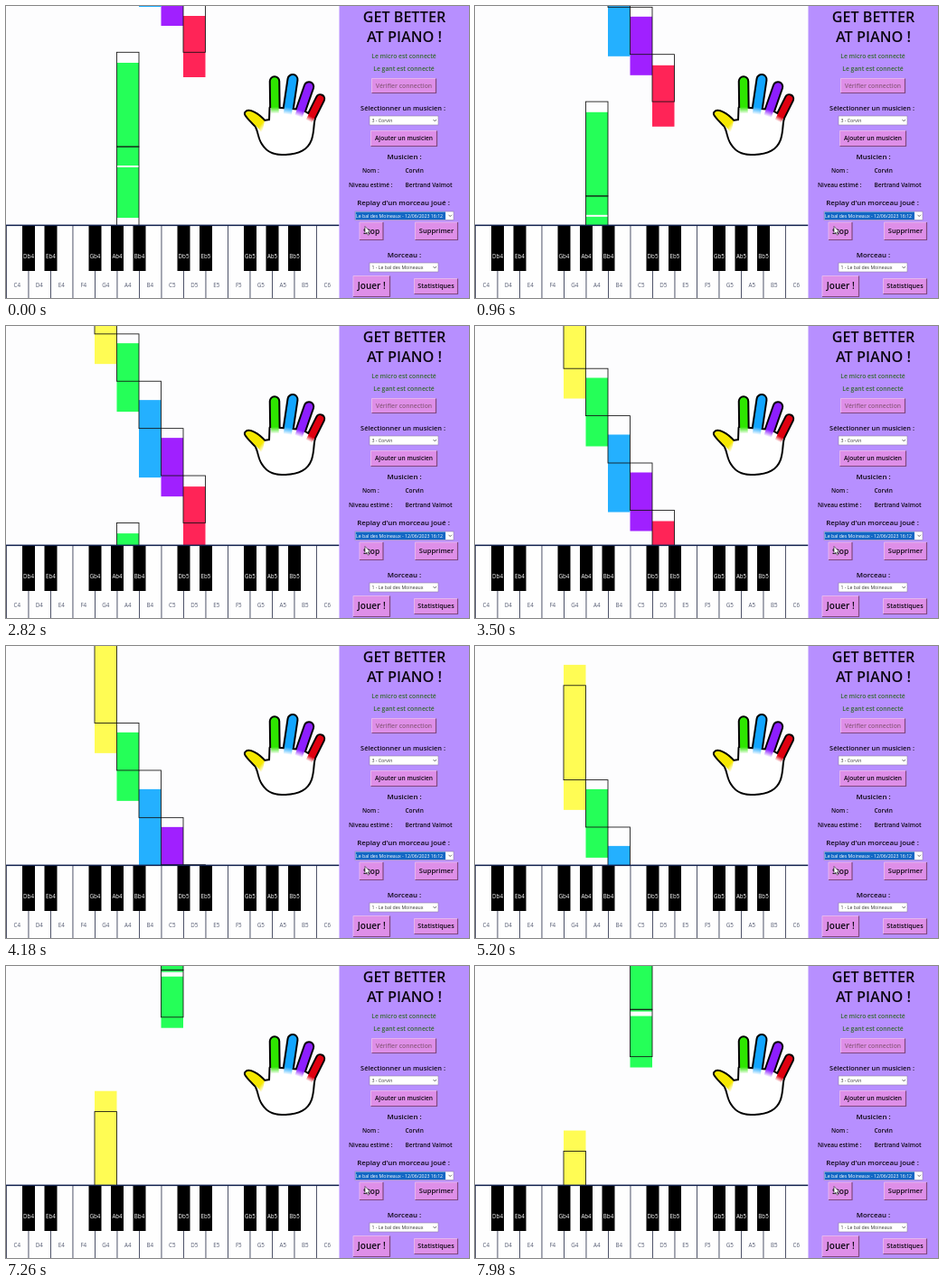
An HTML page for the animation above (8 s loop, 512 by 324 pixels).

```html
<!DOCTYPE html>
<html lang="fr">
<head>
<meta charset="utf-8">
<title>Piano</title>
<style>
  html, body { margin: 0; width: 100%; height: 100%; overflow: hidden; background: #fdfdfe; }
  svg { display: block; width: 100vw; height: 100vh; font-family: "Open Sans", sans-serif; }
  .box { fill: none; stroke: #111; stroke-width: .85; }
</style>
</head>
<body>
<svg viewBox="0 0 512 324">
  <defs><clipPath id="lane"><rect width="368" height="243"/></clipPath></defs>
  <rect width="512" height="324" fill="#fdfdfe"/>
  <g clip-path="url(#lane)"><g id="notes"></g></g>
  <g id="keys"></g>
  <g id="hand"></g>
  <rect x="368.500" width="143.500" height="324" fill="#b78fff"/>
  <g id="panel"></g>
  <path d="M397 244.500v8.500l2-1.800 1.400 3 1.300-.6-1.300-2.900h2.600z" fill="#fff" stroke="#222" stroke-width=".6"/>
</svg>
<script>
const $ = id => document.getElementById(id);

function add(parent, tag, attrs, text) {
  const node = document.createElementNS("http://www.w3.org/2000/svg", tag);
  for (const name in attrs) node.setAttribute(name, attrs[name]);
  if (text) node.textContent = text;
  return parent.appendChild(node);
}

const KEY = 24.5;
const BEAT = 52.4;
const ORIGIN = 51.3;

// Played bars: key, top, bottom, colour
const green = "#25ff58", red = "#ff2457", purple = "#a020ff", blue = "#24b0ff", yellow = "#fffc54";
const played = [
  [5, 63, 177, green], [5, 179, 235, green], [8, 11, 79, red], [7, -43, 22, purple],
  [6, -85, 1, blue], [5, -148, -72, green], [4, -286, -125, yellow],
  [7, -413, -356, green], [7, -482, -418, green]
];
// Expected notes: key, top and length in beats
const expected = [
  [5, 2, 2], [5, 0, 2], [8, -1, 1], [7, -2, 1], [6, -3, 1],
  [5, -4, 1], [4, -6, 2], [7, -9, 1], [7, -10, 1]
];
const notes = $("notes");

for (const [key, top, bottom, fill] of played)
  add(notes, "rect", { x: key * KEY, y: top, width: KEY, height: bottom - top, fill });
for (const [key, beat, length] of expected)
  add(notes, "rect", { class: "box", x: key * KEY, y: ORIGIN + beat * BEAT, width: KEY, height: length * BEAT });

// Keyboard
const keys = $("keys");
add(keys, "rect", { y: 243, width: 368.5, height: 81, fill: "#fefefe" });
for (let i = 0; i < 15; i++) {
  const x = i * KEY;
  add(keys, "rect", { x, y: 243, width: .9, height: 81, fill: "#3a4058" });
  add(keys, "text", { x: x + KEY / 2, y: 312.3, "font-size": 6.2, fill: "#555b72", "text-anchor": "middle" },
    "CDEFGAB"[i % 7] + (4 + Math.floor(i / 7)));
}
for (let i = 1; i < 14; i++) {
  const name = " DE GAB"[i % 7];
  if (name === " ") continue;
  const x = i * KEY + .5;
  add(keys, "rect", { x: x - 7, y: 243, width: 14, height: 51, fill: "#000" });
  add(keys, "text", { x, y: 280, "font-size": 6.2, fill: "#fff", "text-anchor": "middle" },
    name + "b" + (4 + Math.floor(i / 7)));
}
add(keys, "rect", { y: 242.6, width: 368.5, height: 1.5, fill: "#10204e" });

// Hand: black silhouette first, then palm and shaded fingers
const hand = $("hand");
const palm = "M275 131C280 137 279 146 284 153C290 163 299 164 309 164C324 163 333 159 337 148C340 139 339 131 341 124L327 116L292.500 113L292 127L285 128Z";
const thumb = "M266 117.500C269 115 278 119 286 128L283 141C278 133 270 128 265.500 121Q264 119 266 117.500Z";
const fingers = [
  [297, 83.500, 297.5, 121, 8.5, "#2ee600"],
  [317, 81.500, 311, 122, 9, "#12a5ff"],
  [335, 89.500, 323, 124, 8.5, "#8d1eff"],
  [347.5, 103, 334.5, 129, 7.5, "#e00010"]
];
const OUTLINE = 4;

function bar([x1, y1, x2, y2, width], stroke, extra = 0) {
  add(hand, "path", { d: `M${x1} ${y1}L${x2} ${y2}`, stroke, "stroke-width": width + extra, "stroke-linecap": "round" });
}
function fade(id, color, x1, y1, x2, y2) {
  const gradient = add(hand, "linearGradient", { id, gradientUnits: "userSpaceOnUse", x1, y1, x2, y2 });
  add(gradient, "stop", { offset: .76, "stop-color": color });
  add(gradient, "stop", { offset: .96, "stop-color": "#fff" });
  return `url(#${id})`;
}

fingers.forEach(finger => bar(finger, "#000", OUTLINE));
add(hand, "path", { d: palm + thumb, stroke: "#000", "stroke-width": OUTLINE, "stroke-linejoin": "round" });
add(hand, "path", { d: palm, fill: "#fff" });
add(hand, "path", { d: thumb, fill: fade("thumb", "#f5e800", 264, 118, 287, 136) });
fingers.forEach((finger, i) => {
  const [x1, y1, x2, y2, , color] = finger;
  bar(finger, fade("finger" + i, color, x1, y1, x2, y2));
});

// Side panel
const panel = $("panel");
const ink = "#0d0712", connected = "#35692f";

function label(text, x, y, size, fill = ink, anchor = "middle", weight = 600) {
  add(panel, "text", { x, y: y + size * .34, "font-size": size, "font-weight": weight, fill, "text-anchor": anchor }, text);
}
function button(text, x, y, w, h, size, fill = ink) {
  add(panel, "rect", { x, y, width: w, height: h, fill: "#de8fe8" });
  add(panel, "path", { d: `M${x} ${y + h}V${y}H${x + w}`, fill: "none", stroke: "#e6b4ee" });
  add(panel, "path", { d: `M${x} ${y + h}H${x + w}V${y}`, fill: "none", stroke: "#80487e", "stroke-width": 1.2 });
  label(text, x + w / 2, y + h / 2, size, fill);
}
function select(text, x, y, w, h, selected) {
  add(panel, "rect", { x, y, width: w, height: h, fill: "#fff", stroke: "#8c7ca8", "stroke-width": .6 });
  if (selected) add(panel, "rect", { x: x + .5, y: y + .5, width: w - 9.5, height: h - 1, fill: "#1267c4" });
  label(text, x + (selected ? 1 : 2.5), y + h / 2, 5.2, selected ? "#fff" : "#333", "start", 400);
  add(panel, "path", { d: `M${x + w - 5.5} ${y + h / 2 - 1}l1.700 1.800 1.700-1.800`, fill: "none", stroke: "#333", "stroke-width": .7 });
}

label("GET BETTER", 440.5, 12.5, 16.1);
label("AT PIANO !", 440.5, 34, 16.3);
label("Le micro est connecté", 440, 56, 6.8, connected);
label("Le gant est connecté", 440, 70, 6.8, connected);
button("Vérifier connection", 404.5, 80.5, 71, 16, 6.8, "#8c5a80");
label("Sélectionner un musicien :", 439, 113, 7.4);
select("3 - Corvin", 402, 122, 76, 10);
button("Ajouter un musicien", 403.5, 138.5, 73, 17, 6.6);
label("Musicien :", 440.5, 167, 7.9);
label("Nom :", 394, 182.5, 6.5, ink, "start");
label("Corvin", 441.5, 182.5, 6.5, ink, "start");
label("Niveau estimé :", 379, 199, 6.5, ink, "start");
label("Bertrand Valmot", 441.5, 199, 6.5, ink, "start");
label("Replay d'un morceau joué :", 439.5, 218, 7.9);
select("Le bal des Moineaux - 12/06/2023 16:12", 386, 228, 109, 9.5, true);
button("Stop", 391, 240, 26, 19.5, 8.4);
button("Supprimer", 452.5, 240, 47, 19.5, 7.5);
label("Morceau :", 440.5, 276, 7.9);
select("1 - Le bal des Moineaux", 402, 285, 76, 10);
button("Jouer !", 384, 299.5, 40.5, 23, 10);
button("Statistiques", 451.5, 302.5, 48, 17, 7.1);

// Three uneven steps every 140 ms, each moving the notes equally far
const LOOP = 8000, STEP = 2.74;
const start = performance.now();

function draw(now) {
  const t = Math.max(0, now - start) % LOOP;
  const phase = t % 140;
  const steps = 3 * Math.floor(t / 140) + (phase >= 120 ? 2 : phase >= 20 ? 1 : 0);
  notes.setAttribute("transform", `translate(0 ${steps * STEP})`);
  requestAnimationFrame(draw);
}
draw(start);
</script>
</body>
</html>
```
